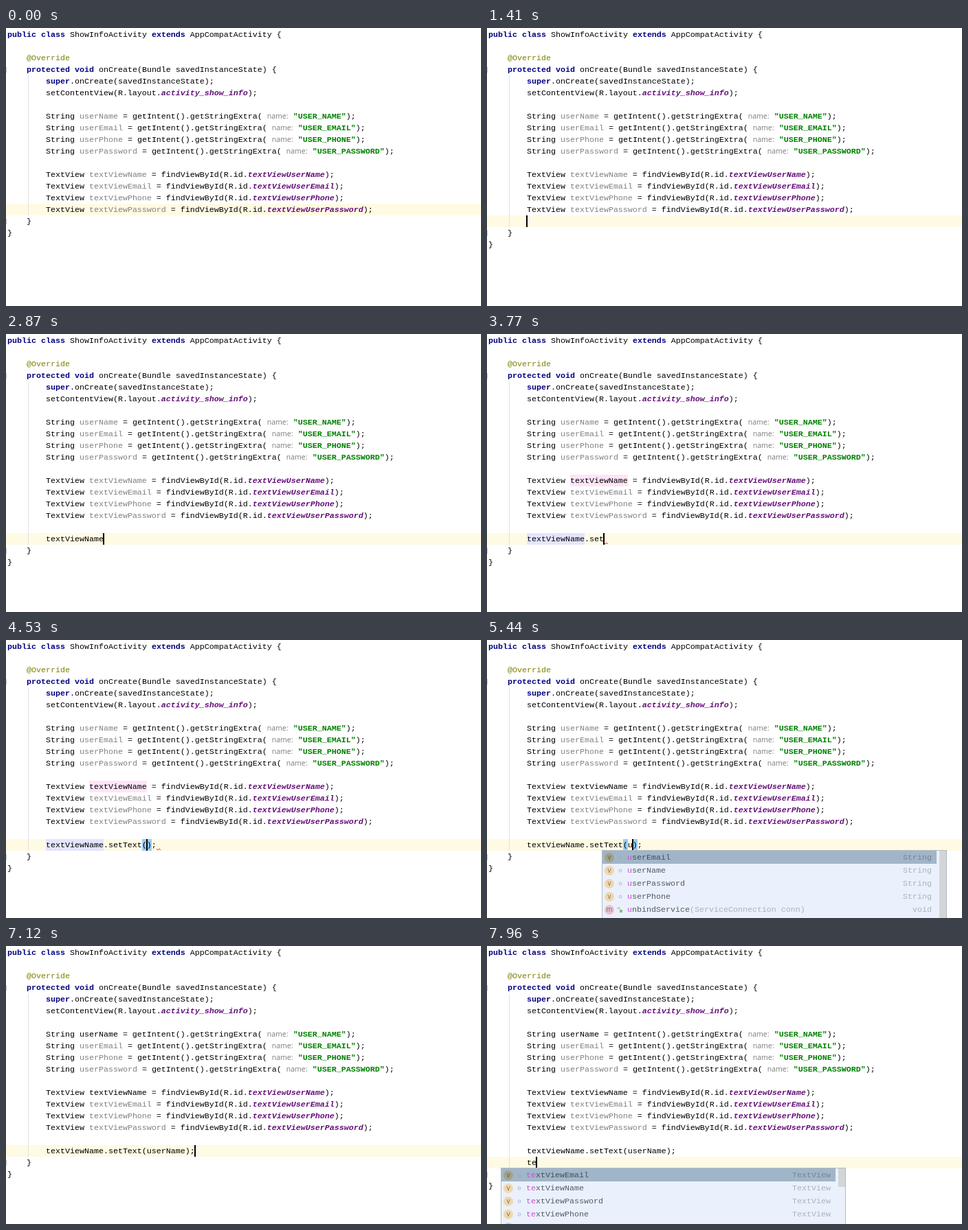
An HTML page for the animation above (8000 ms loop, 691 px wide and 405 px high).

```html
<!DOCTYPE html>
<html lang="en">
<head>
<meta charset="utf-8">
<title>Typing code with completion</title>
<style>
html, body { margin: 0; width: 100%; height: 100%; overflow: hidden; background: #fff; }
#stage { position: relative; width: 691px; height: 405px; overflow: hidden;
  font: 11.667px "Liberation Mono", monospace; color: #000; }
#stage div, #stage svg { position: absolute; }
.line { left: 2px; white-space: pre; line-height: 19px; }
.key { color: #000080; font-weight: bold; }
.note { color: #808000; }
.str { color: #008000; font-weight: bold; }
.field { color: #660e7a; font-weight: bold; font-style: italic; }
.unused { color: #808080; }
.hint { display: inline-block; width: 45px; height: 14px; color: #7a7a7a;
  font: 10.5px/14px "Open Sans", sans-serif; text-indent: 7px; }
.fold { left: -7px; width: 6px; height: 6px; border: 1px solid #c4c4c4; }
.popup { width: 500px; height: 120px; border: 1px solid #b3bac2; background: #ebf4fe; overflow: hidden; }
.item { left: 0; width: 486px; height: 19px; line-height: 21px; white-space: pre; }
.item .name { left: 36px; }
.item .type { right: 7px; color: #999; }
.item i { font-style: normal; color: #999; }
.item b { font-weight: normal; color: #b800b8; }
.sel { background: #0052a4; color: #fff; }
.sel .type, .sel i { color: #d5e2ef; }
.sel b { color: #f9eccc; }
.dim { background: #eaf1fc; }
.dim .item { color: #555b62; }
.dim .type, .dim i { color: #adb2b8; }
.dim b { color: #d04fd6; }
.dim .sel { background: #a0b6c8; color: #434d56; }
.dim .sel .type { color: #76848f; }
.dim svg { opacity: .75; }
.thumb { left: 490px; top: 0; width: 10px; background: #d4d5d7; }
</style>
</head>
<body>
<div id="stage"></div>
<script>
const LOOP = 8000, LINE = 17, CHAR = 7, INDENT = 58;
const BLUE = '#99ccff', READ = '#e4e4ff', WRITE = '#ffe4f8';

const cap = s => s[0].toUpperCase() + s.slice(1);
const extra = s => `        String user${cap(s)} = getIntent().getStringExtra(~"USER_${s.toUpperCase()}");`;
const view = s => `        TextView textView${s} = findViewById(R.id.textViewUser${s});`;
const code = [
  'public class ShowInfoActivity extends AppCompatActivity {', '',
  '    @Override',
  '    protected void onCreate(Bundle savedInstanceState) {',
  '        super.onCreate(savedInstanceState);',
  '        setContentView(R.layout.activity_show_info);', '',
  ...['name', 'email', 'phone', 'password'].map(extra), '',
  ...['Name', 'Email', 'Phone', 'Password'].map(view)
];

const fields = ['Email', 'Name', 'Password', 'Phone'];
const lists = {
  views: [...fields.map(f => ['textView' + f, 'TextView']), ['takeKeyEvents', 'void', '(boolean get)']],
  users: [...fields.map(f => ['user' + f, 'String']), ['unbindService', 'void', '(ServiceConnection conn)']],
  setters: [['setText', 'void', '(CharSequence text)'], ['setText', 'void', '(int resid)'],
    ['setEnabled', 'void', '(boolean enabled)'], ['setVisibility', 'void', '(int visibility)'],
    ['setHint', 'void', '(CharSequence hint)']],
  texts: [['setText', 'void', '(CharSequence text)'], ['setText', 'void', '(int resid)'],
    ['setTextSize', 'void', '(float size)'], ['setTextColor', 'void', '(int color)'],
    ['setTextScaleX', 'void', '(float size)']]
};

// Marks are [line, column, length, color]; squiggle is [column, length].
const call = 'textViewName.setText';
const nameMarks = [[12, 9, 12, WRITE], [17, 0, 12, READ]];
const userMarks = [[7, 7, 8, WRITE], [17, 21, 8, READ]];
const parens = n => [[17, 20, 1, BLUE], [17, 21 + n, 1, BLUE]];
const popup = (list, typed, col, options) => ({ list, typed, col, pick: 0, dim: true, thumb: 27, ...options });
const views = popup('views', 'te', 0);
const users = popup('users', 'u', 21, { thumb: 120 });
const setters = popup('setters', 'set', 13, { dim: false });
const done = call + '(userName);';

// Each step changes the state left by the one before it.
const steps = [
  [0, { draft: [], col: 68, caret: false, used: [], marks: [], squiggle: null, popup: null }],
  [60, { caret: true }],
  [590, { caret: false }],
  [1120, { caret: true }],
  [1410, { draft: [''], col: 0 }],
  [1650, { draft: ['', ''] }],
  [1800, { draft: ['', 't'], col: 1 }],
  [1870, { draft: ['', 'te'], col: 2 }],
  [1940, { popup: views }],
  [2630, { caret: false, popup: { ...views, dim: false, pick: 1 } }],
  [2870, { draft: ['', 'textViewName'], col: 12, caret: true, popup: null }],
  [3160, { used: ['textViewName'], marks: nameMarks }],
  ...['.', '.s', '.se', '.set'].map((s, i) => [3550 + Math.round(i * 220 / 3),
    { draft: ['', 'textViewName' + s], col: 13 + i, squiggle: i === 3 ? [16, 1] : null }]),
  [3910, { popup: setters }],
  [4220, { draft: ['', 'textViewName.sett'], col: 17, squiggle: null,
    popup: { ...setters, list: 'texts', typed: 'sett', thumb: 60 } }],
  [4530, { draft: ['', call + '();'], col: 21, popup: null, squiggle: [23, 1],
    marks: [...nameMarks, ...parens(0)] }],
  [4820, { marks: parens(0), squiggle: null }],
  [4900, { squiggle: [21, 1] }],
  [5360, { draft: ['', call + '(u);'], col: 22, marks: parens(1), squiggle: null }],
  [5433, { popup: users }],
  [5507, { draft: ['', call + '(us);'], col: 23, marks: parens(2), popup: { ...users, typed: 'us' } }],
  [5580, { squiggle: [21, 2] }],
  [6040, { caret: false }],
  [6120, { popup: { ...users, typed: 'us', dim: false, pick: 1 } }],
  [6380, { draft: ['', done], col: 29, caret: true, marks: parens(8), squiggle: null, popup: null }],
  [6660, { used: ['textViewName', 'userName'] }],
  [6740, { marks: [...userMarks, ...parens(8)] }],
  [6970, { col: 31 }],
  [7045, { marks: userMarks }],
  [7120, { marks: [] }],
  [7510, { draft: ['', done, ''], col: 0 }],
  [7800, { draft: ['', done, 'te'], col: 2 }],
  [7960, { popup: views }]
];
let latest = {};
const states = steps.map(([at, change]) => latest = { ...latest, ...change, at });

const rowTop = row => 1 + row * LINE;
const colLeft = col => INDENT + col * CHAR;
const span = (cls, text) => `<span class="${cls}">${text}</span>`;
const box = (x, y, w, h, color) =>
  `<div style="left:${x}px;top:${y}px;width:${w}px;height:${h}px;background:${color}"></div>`;

function colorize(line, used) {
  const rule = /\b(public|class|extends|protected|void|super)\b|(@\w+)|("\w+")|(R\.(?:id|layout)\.)(\w+)|(?<=(?:String|TextView) )(\w+)|(~)/g;
  return line.replace(rule, (all, key, note, str, path, field, local, hint) =>
    key ? span('key', key) : note ? span('note', note) : str ? span('str', str) :
    path ? path + span('field', field) : hint ? span('hint', 'name:') :
    used.includes(local) ? local : span('unused', local));
}

function emphasize(name, typed) {
  const hits = new Set();
  let next = 0;
  for (const c of typed) {
    const near = name[next].toLowerCase() === c;
    const i = near ? next : name.indexOf(c.toUpperCase(), next);
    hits.add(i);
    next = i + 1;
  }
  return [...name].map((c, i) => hits.has(i) ? `<b>${c}</b>` : c).join('');
}

function icons(method, picked) {
  const fill = method ? '#efb0c0' : picked ? '#a59a70' : '#f3cf93';
  const access = method
    ? '<path d="M25 10h4v4h-4z" fill="#62b543"/><path d="M25 10v-2a1.5 1.5 0 0 0-3 0v1" fill="none" stroke="#62b543"/>'
    : '<circle cx="26" cy="10" r="2" fill="none" stroke="#9aa7b0"/>';
  return `<svg width="34" height="19"><circle cx="10" cy="10" r="7" fill="${fill}"/>` +
    `<text x="10" y="13.3" text-anchor="middle" font-family="Open Sans, sans-serif" font-size="10" fill="#4d4536">${method ? 'm' : 'v'}</text>${access}</svg>`;
}

function drawPopup(p, row) {
  const items = lists[p.list].concat([lists[p.list][4]]);
  const rows = items.map(([name, type, args], i) =>
    `<div class="item ${i === p.pick ? 'sel' : ''}" style="top:${i * 19}px">${icons(args, i === p.pick)}` +
    `<div class="name">${emphasize(name, p.typed)}${args ? `<i>${args}</i>` : ''}</div>` +
    `<div class="type">${type}</div></div>`).join('');
  return `<div class="popup ${p.dim ? 'dim' : ''}" style="left:${colLeft(p.col) - 38}px;top:${rowTop(row) + 16}px">` +
    `${rows}<div class="thumb" style="height:${p.thumb}px"></div></div>`;
}

function drawSquiggle([col, len], row) {
  const points = Array.from({ length: len * 3 + 1 }, (_, i) => `${i * 2},${i % 2 ? 3 : 1}`).join(' ');
  return `<svg style="left:${colLeft(col)}px;top:${rowTop(row) + 13}px" width="${len * 7}" height="4">` +
    `<polyline points="${points}" fill="none" stroke="#f03030"/></svg>`;
}

function draw(s) {
  const row = 15 + s.draft.length;
  const lines = [...code, ...s.draft.map(t => ' '.repeat(8) + t), '    }', '}'];
  const fold = r => `<div class="fold" style="top:${rowTop(r) + 5}px"></div>`;
  return box(0, rowTop(row), 691, LINE, '#fffae3') +
    box(32, rowTop(4), 1, rowTop(row + 1) - rowTop(4), '#e2e2e2') + fold(3) + fold(row + 1) +
    s.marks.map(([r, col, len, color]) => box(colLeft(col), rowTop(r), len * CHAR, LINE, color)).join('') +
    lines.map((t, i) => `<div class="line" style="top:${rowTop(i)}px">${colorize(t, s.used)}</div>`).join('') +
    (s.squiggle ? drawSquiggle(s.squiggle, row) : '') +
    (s.caret ? box(colLeft(s.col) - 1, rowTop(row), 2, LINE, '#000') : '') +
    (s.popup ? drawPopup(s.popup, row) : '');
}

const stage = document.getElementById('stage');
const start = performance.now();
let shown;
function tick() {
  const t = (performance.now() - start) % LOOP;
  const state = states.findLast(s => s.at <= t);
  if (state !== shown) stage.innerHTML = draw(shown = state);
  requestAnimationFrame(tick);
}
tick();
</script>
</body>
</html>
```
